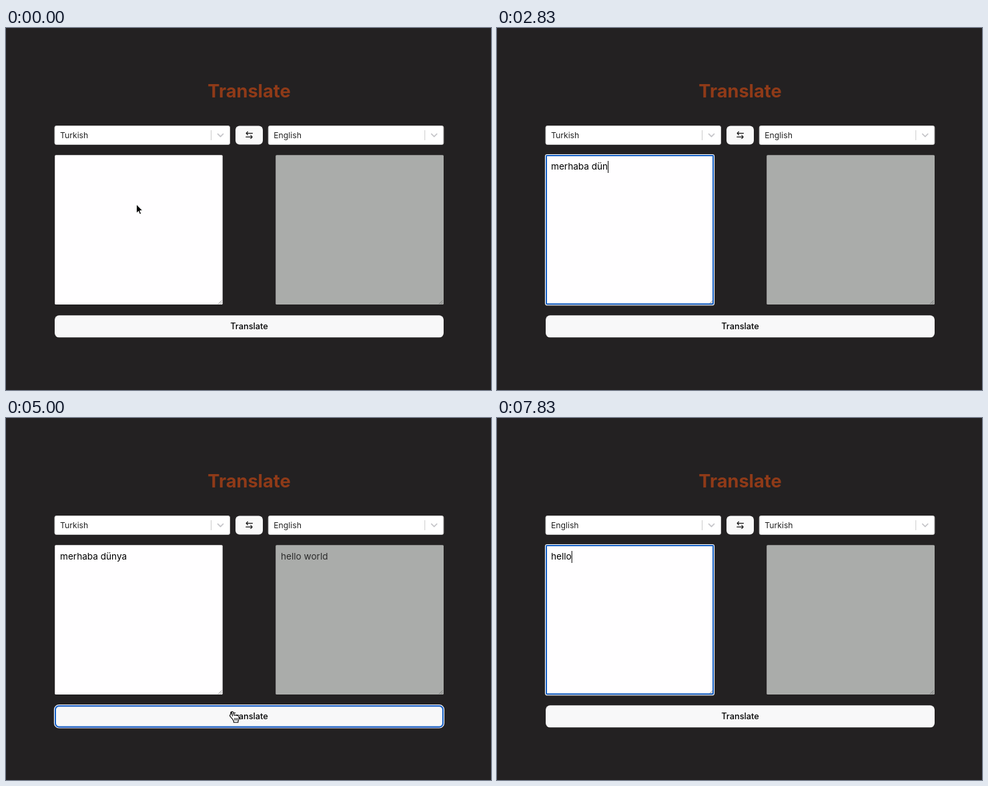
Recreate the animation shown at these times as an HTML page. Size 727 by 542 pixels, loop 8 s.

```html
<!DOCTYPE html>
<html lang="en">
<head>
<meta charset="utf-8">
<title>Translate</title>
<style>
  html, body { margin: 0; width: 100%; height: 100%; overflow: hidden; background: #232122; }
  svg { display: block; font-family: Inter, "Open Sans", sans-serif; }
  text { white-space: pre; }
  .title { font-size: 27.2px; font-weight: 700; fill: #8f3a18; text-anchor: middle; }
  .label { font-size: 12.2px; fill: #222; }
  .body { font-size: 13.6px; fill: #000; }
  .action { font-size: 12.8px; font-weight: 500; text-anchor: middle; }
  .line { fill: none; stroke-linecap: round; stroke-linejoin: round; }
  .hidden { visibility: hidden; }
</style>
</head>
<body>
<svg width="727" height="542" viewBox="0 0 727 542">
  <defs>
    <g id="select">
      <rect x=".5" y=".5" width="262.5" height="28" rx="2.5" fill="#fff" stroke="#ccc"/>
      <path d="M235 7v15" stroke="#ccc"/>
      <path class="line" d="M245 12.7l4 4 4-4" stroke="#c6c6ca" stroke-width="1.7"/>
    </g>
    <path id="grip" class="line" d="M-6 -1l5 -5M-3 -1l2 -2" stroke="#666" stroke-width=".8"/>
    <g id="halo" fill="none">
      <rect class="outer" stroke="#fff"/>
    </g>
  </defs>

  <text class="title" x="364.5" y="104">Translate</text>

  <use href="#select" x="72.5" y="146"/>
  <use href="#select" x="392.8" y="146"/>
  <text class="label" id="from" x="81" y="164.6"></text>
  <text class="label" id="to" x="401.3" y="164.6"></text>

  <rect id="swap" x="344" y="146.5" width="41" height="28" rx="6" fill="#f9f9f9"/>
  <path class="line" d="M369.5 157.6H360M362.4 155.2L360 157.6l2.4 2.4M359.7 163.1h9.5M366.8 160.7l2.4 2.4-2.4 2.4"
        stroke="#111" stroke-width="1.1"/>

  <rect x="73.2" y="190.3" width="251.5" height="223.7" rx="1.5" fill="#fffeff"/>
  <use href="#grip" x="324.5" y="414"/>
  <rect x="404.2" y="190.3" width="251.8" height="223.7" rx="1.5" fill="#aaacaa"/>
  <use href="#grip" x="655.5" y="414"/>
  <text class="body" id="input" x="81" y="212.3"></text>
  <text class="body" id="output" x="412" y="212.3" style="fill:#2b2b2b"></text>
  <rect id="caret" y="199" width="1" height="18"/>

  <rect id="go" x="73" y="430.3" width="583" height="33" rx="6.5" fill="#f8f8f9"/>
  <text class="action" x="364.5" y="451.4">Translate</text>

  <g id="focus" fill="none">
    <rect stroke="#fff" stroke-width="1.2"/>
    <rect stroke="#1660c4" stroke-width="2"/>
  </g>

  <g id="pointer">
    <g id="ring" fill="none">
      <circle stroke="#fff" stroke-width="3.4"/>
      <circle stroke="#000" stroke-width="1.7"/>
    </g>
    <path id="arrow" d="M0 0V13.2L3.1 10.3 5 15 7.2 14.1 5.3 9.6H9.4Z"
          stroke="#fff" stroke-width="1" stroke-linejoin="round"/>
    <g id="beam" class="line">
      <path d="M-3-7.5Q0-7.5 0-5.5Q0-7.5 3-7.5M0-5.5V5.5M-3 7.5Q0 7.5 0 5.5Q0 7.5 3 7.5M-1.5 1.5h3" stroke="#fff" stroke-width="2.8"/>
      <path d="M-3-7.5Q0-7.5 0-5.5Q0-7.5 3-7.5M0-5.5V5.5M-3 7.5Q0 7.5 0 5.5Q0 7.5 3 7.5M-1.5 1.5h3" stroke="#000" stroke-width="1.2"/>
    </g>
    <g id="hand" stroke="#000" stroke-width="1.1" stroke-linejoin="round" stroke-linecap="round">
      <path fill="#fff" d="M0 11.5L-3.6 7.4Q-4.6 5.7-3.2 5.1Q-2-4.6.1 7L-1.6 2Q-1.8.4-.5.2Q.8 0 1.3 1.6L2.6 6
        Q3.4 4.8 5 6Q6.1 5.2 7.2 6.4Q9.2 5.9 9.6 8V11.5Q9.4 13.2 8.4 14.5V16.5H1.8V14.8Z"
        transform="translate(0 .3)"/>
      <path class="line" d="M3.2 10.5v3M5.2 10.5v3M7.2 10.5v3" stroke-width=".9"/>
    </g>
  </g>
</svg>

<script>
const $ = id => document.getElementById(id);
const LOOP = 8000, STEPS = 48;

// [step, shape, x, y]
const path = [
  [0, "arrow", 195.5, 264], [1, "beam", 185, 262], [2, "beam", 178, 259], [7, "", 0, 0],
  [21, "beam", 190, 243], [22, "beam", 207, 238], [23, "beam", 238, 300], [24, "beam", 290, 385],
  [25, "hand", 339.5, 439], [32, "arrow", 345, 370], [33, "arrow", 356, 250],
  [34, "hand", 365.5, 161], [37, "beam", 158, 256], [42, "", 0, 0]
];
const focusSteps = [[0, ""], [5, "area"], [27, "go"], [36, "swap"], [38, "area"]];
const boxes = { // x, y, width, height, radius
  area: [73, 190, 252, 224.3, 2],
  go: [73, 430.2, 583, 33.3, 6.5],
  swap: [344, 146.3, 41.2, 28.5, 6]
};
const clicks = [4, 26, 35, 37];

const at = (table, step) => table.filter(row => row[0] <= step).pop();
const show = (el, on) => el.classList.toggle("hidden", !on);
const within = (step, a, b) => step >= a && step <= b;

function set(el, attrs) {
  for (const key in attrs) el.setAttribute(key, attrs[key]);
}

function frame(el, [x, y, width, height, rx], grow) {
  set(el, { x: x - grow, y: y - grow, width: width + 2 * grow, height: height + 2 * grow, rx: rx + grow });
}

function hover(el, on) {
  el.setAttribute("stroke", on ? "#535bf2" : "none");
}

function draw(step) {
  const swapped = step >= 36;
  $("from").textContent = swapped ? "English" : "Turkish";
  $("to").textContent = swapped ? "Turkish" : "English";

  const [phrase, start] = swapped ? ["hello", 41] : ["merhaba dünya", 6];
  $("input").textContent = phrase.slice(0, Math.max(0, step - start));
  $("output").textContent = within(step, 29, 35) ? "hello world" : "";

  const focus = at(focusSteps, step)[1];
  show($("focus"), focus);
  if (focus) {
    const [outer, inner] = $("focus").children;
    frame(outer, boxes[focus], .5);
    frame(inner, boxes[focus], -1);
  }

  const blink = within(step, 23, 26) || step === 41;
  show($("caret"), focus === "area" && !blink);
  $("caret").setAttribute("x", 81 + $("input").getComputedTextLength());

  hover($("go"), within(step, 25, 31));
  hover($("swap"), within(step, 34, 36));

  const [, shape, x, y] = at(path, step);
  $("pointer").setAttribute("transform", `translate(${x} ${y})`);
  for (const id of ["arrow", "beam", "hand"]) show($(id), id === shape);

  const radius = clicks.includes(step) ? 30 : clicks.includes(step - 1) ? 16.5 : 0;
  show($("ring"), radius);
  for (const c of $("ring").children) set(c, { r: radius });
}

let current = -1;
function tick() {
  const time = performance.now() % LOOP;
  const step = Math.floor((time + 5) / (LOOP / STEPS)) % STEPS;
  if (step !== current) draw(current = step);
  requestAnimationFrame(tick);
}
tick();
</script>
</body>
</html>
```
